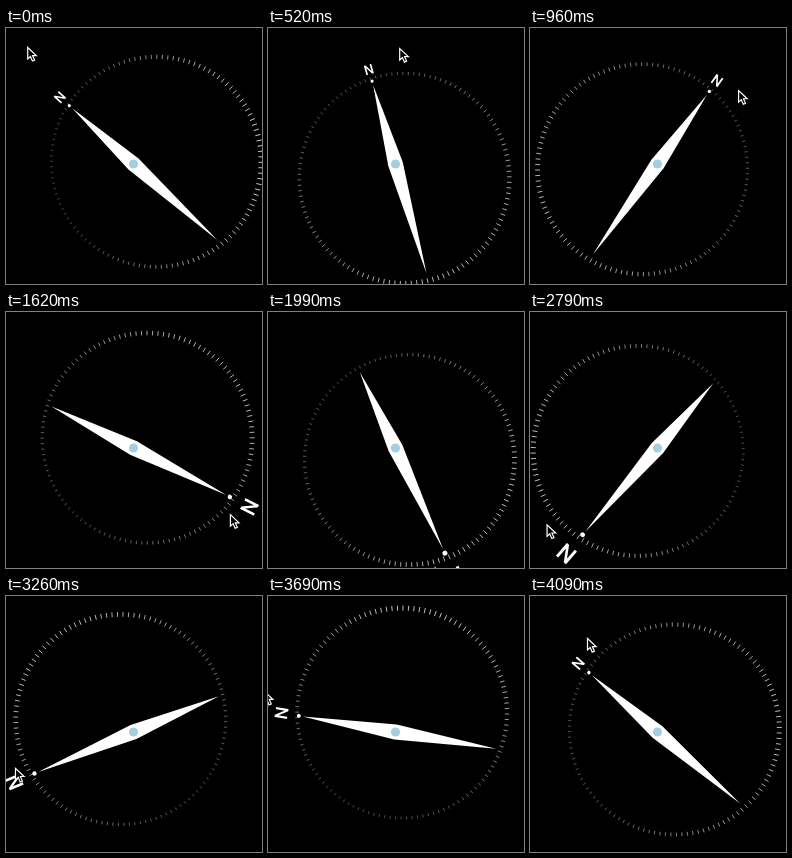
Write an HTML page with a canvas that moves like this. It is 256 px wide and 256 px high and loops after 4120 ms.

```html
<!DOCTYPE html>
<html lang="en">
<head>
<meta charset="utf-8">
<title>Compass</title>
<style>
  html, body { margin: 0; width: 100%; height: 100%; overflow: hidden; background: #000; }
  canvas { display: block; width: 256px; height: 256px; }
</style>
</head>
<body>
<canvas id="stage" width="256" height="256"></canvas>
<script>
const LOOP = 4120, CX = 127.5, CY = 136, TICKS = 120, RADIUS = 105;
const ctx = document.getElementById('stage').getContext('2d');

// [time, needle heading in degrees]
const HEADING = [
  [0, -47.8], [520, -15.9], [960, 35.4], [1620, 116.8], [2360, 189.4],
  [2660, 213], [3260, 247.2], [4090, 310.8], [4120, 312.2]
];
// [time, pointer x, pointer y]
const POINTER = [
  [0, 21, 19], [260, 75, 16], [520, 131, 20], [740, 175, 34], [960, 208, 62],
  [1300, 230, 130], [1620, 224, 202], [2000, 165, 256], [2360, 88, 250],
  [2760, 19, 215], [3260, 9, 172], [3600, -6, 112], [3940, 15, 50], [4090, 57, 42]
];

// Smooth curve through unevenly timed keys
function sample(keys, t, col) {
  const last = keys.length - 1;
  if (t >= keys[last][0]) return keys[last][col];
  let i = 0;
  while (t >= keys[i + 1][0]) i++;
  const slope = k => {
    const a = keys[Math.max(k - 1, 0)], b = keys[Math.min(k + 1, last)];
    return (b[col] - a[col]) / (b[0] - a[0]);
  };
  const [p, q] = [keys[i], keys[i + 1]];
  const span = q[0] - p[0], u = (t - p[0]) / span, v = 1 - u;
  return v * v * (1 + 2 * u) * p[col] + u * u * (3 - 2 * u) * q[col]
    + span * u * v * (v * slope(i) - u * slope(i + 1));
}

function disc(x, y, r, color) {
  ctx.fillStyle = color;
  ctx.beginPath();
  ctx.arc(x, y, r, 0, Math.PI * 2);
  ctx.fill();
}

// Ticks grow and brighten on the side the dial leans towards
function drawRing(heading, lean) {
  const dir = 2 * heading + Math.PI;
  ctx.save();
  ctx.translate(CX + lean * Math.sin(dir), CY - lean * Math.cos(dir));
  ctx.strokeStyle = '#fff';
  ctx.lineWidth = 1;
  for (let i = 0; i < TICKS; i++) {
    const a = heading + i * Math.PI * 2 / TICKS;
    const near = Math.cos(a - dir) * lean / 17;
    const half = 2 + 0.5 * near;
    const sx = Math.sin(a), sy = -Math.cos(a);
    ctx.globalAlpha = 0.52 + 0.2 * near;
    ctx.beginPath();
    ctx.moveTo(sx * (RADIUS - half), sy * (RADIUS - half));
    ctx.lineTo(sx * (RADIUS + half), sy * (RADIUS + half));
    ctx.stroke();
  }
  ctx.restore();
}

function drawNeedle(heading, shift) {
  const dot = 100 + shift;
  ctx.save();
  ctx.translate(CX, CY);
  ctx.rotate(heading);
  ctx.fillStyle = '#fff';
  ctx.beginPath();
  ctx.moveTo(0, 4 - dot);
  ctx.lineTo(7.5, 0);
  ctx.lineTo(0, 100 - shift);
  ctx.lineTo(-7.5, 0);
  ctx.fill();
  disc(0, -dot, 2 + 0.03 * shift, '#fff');
  const size = 18.5 + 0.35 * shift;
  ctx.font = `500 ${size}px Roboto, "Liberation Sans", sans-serif`;
  ctx.textAlign = 'center';
  ctx.fillText('N', 0, -dot - 18.5 - 0.45 * shift + size * 0.36);
  ctx.restore();
  disc(CX, CY, 4.6, '#a5cfe0');
}

const arrow = new Path2D('M0 0V11.5L2.7 9L4.7 13.6L6.9 12.7L4.9 8.1H8.6Z');
function drawPointer(x, y) {
  ctx.save();
  ctx.translate(x + 0.5, y + 0.5);
  ctx.fillStyle = '#000';
  ctx.strokeStyle = '#fff';
  ctx.lineWidth = 1.2;
  ctx.fill(arrow);
  ctx.stroke(arrow);
  ctx.restore();
}

function draw(t) {
  const heading = sample(HEADING, t, 1) * Math.PI / 180;
  const x = sample(POINTER, t, 1), y = sample(POINTER, t, 2);
  const lean = 0.145 * Math.hypot(x - CX, y - CY);
  ctx.fillStyle = '#000';
  ctx.fillRect(0, 0, 256, 256);
  drawRing(heading, lean);
  drawNeedle(heading, 1 - 0.92 * lean * Math.cos(heading));
  drawPointer(x, y);
}

const start = performance.now();
function tick() {
  draw((performance.now() - start) % LOOP);
  requestAnimationFrame(tick);
}
tick();
</script>
</body>
</html>
```
